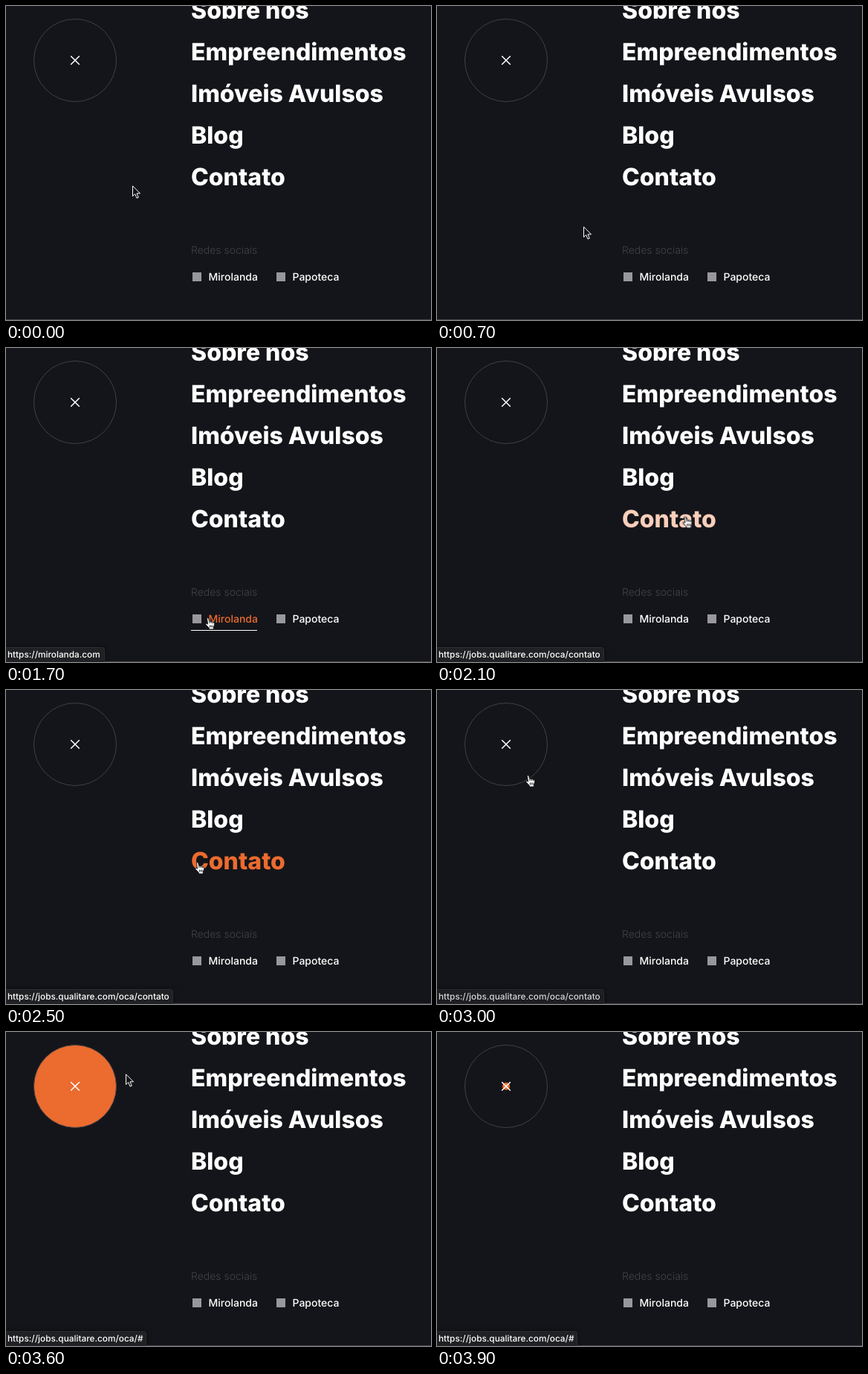
Recreate the animation shown at these times as an HTML page. Size 572 px wide and 422 px high, loop 4000 ms.

```html
<!DOCTYPE html>
<html lang="pt-BR">
<head>
<meta charset="utf-8">
<title>Menu</title>
<style>
  :root { --bg: #14151a; --accent: #ec6b2f; --loop: 4s step-end infinite; }
  html, body { margin: 0; width: 100%; height: 100%; overflow: hidden; background: var(--bg); }
  svg { display: block; width: 572px; height: 422px; }
  text { font-family: Inter, "Noto Sans", sans-serif; fill: #fff; white-space: pre; text-rendering: geometricPrecision; }
  .menu text { font-size: 32px; font-weight: 800; }
  .social text { font-size: 14px; font-weight: 450; }
  .social .label { font-weight: 300; fill: #424348; }
  .badge { fill: #98989c; }

  .ring { fill: none; stroke: #404145; }
  .cross { fill: none; stroke: #fff; stroke-width: 1.5; }
  .disc { fill: var(--accent); transform-origin: 93px 73px; animation: disc var(--loop); }

  .menu .contact { animation: contact var(--loop); }
  .social .photo { animation: photo var(--loop); }
  .underline { fill: #fff; transform-origin: 249px 379px; animation: underline var(--loop); }

  .status { visibility: hidden; }
  .status path { fill: #202124; stroke: #2c2d31; filter: drop-shadow(0 0 3px #0008); }
  .status text { font-size: 11.8px; font-weight: 500; }
  .status.a { animation: statusPhoto var(--loop); }
  .status.b { animation: statusContact var(--loop); }
  .status.c { animation: statusClose var(--loop); }

  .cursor { animation: move var(--loop); }
  .arrow { fill: #101114; stroke: #fff; animation: arrow var(--loop); }
  .hand { fill: #fff; stroke: #101114; stroke-width: .9; stroke-linejoin: round; animation: hand var(--loop); }

  /* 2.5% is one 100 ms tick */
  @keyframes move {
    0%, 5% { transform: translate(170px, 241px); }
    7.5%   { transform: translate(170px, 242px); animation-timing-function: steps(2); }
    12.5%  { transform: translate(177px, 258px); animation-timing-function: steps(2); }
    17.5%  { transform: translate(197px, 296px); }
    20%    { transform: translate(234px, 333px); }
    22.5%  { transform: translate(250px, 348px); }
    25%    { transform: translate(260px, 357px); animation-timing-function: steps(3); }
    32.5%  { transform: translate(268px, 362px); }
    42.5%  { transform: translate(268px, 362px); }
    45%    { transform: translate(290px, 342px); }
    47.5%  { transform: translate(335px, 275px); }
    50%    { transform: translate(358px, 224px); animation-timing-function: steps(3); }
    57.5%  { transform: translate(275px, 229px); animation-timing-function: steps(2); }
    62.5%  { transform: translate(254px, 231px); }
    67.5%  { transform: translate(244px, 222px); }
    70%    { transform: translate(212px, 190px); }
    72.5%  { transform: translate(160px, 146px); }
    75%    { transform: translate(119px, 114px); }
    77.5%  { transform: translate(104px, 94px); }
    80%    { transform: translate(100px, 80px); animation-timing-function: steps(2); }
    85%    { transform: translate(116px, 68px); }
    87.5%  { transform: translate(136px, 61px); }
    90%    { transform: translate(161px, 56px); }
    92.5%  { transform: translate(192px, 34px); }
    95%    { transform: translate(233px, -1px); }
    97.5%, 100% { transform: translate(260px, -30px); }
  }
  @keyframes arrow {
    0%, 45%, 67.5%, 90% { visibility: visible; }
    25%, 50%, 75%, 100% { visibility: hidden; }
  }
  @keyframes hand {
    0%, 45%, 67.5%, 90%, 100% { visibility: hidden; }
    25%, 50%, 75% { visibility: visible; }
  }
  @keyframes disc {
    0%, 75% { transform: scale(0); }
    77.5%   { transform: scale(.2); }
    80%     { transform: scale(.7); }
    82.5%   { transform: scale(.93); }
    85%, 90% { transform: scale(1); }
    92.5%   { transform: scale(.8); }
    95%     { transform: scale(.42); }
    97.5%   { transform: scale(.09); }
    100%    { transform: scale(0); }
  }
  @keyframes contact {
    0%, 75%, 100% { fill: #fff; }
    50%   { fill: #fff; animation-timing-function: steps(3); }
    57.5% { fill: var(--accent); }
    67.5% { fill: var(--accent); animation-timing-function: steps(3); }
  }
  @keyframes photo {
    0%, 50%, 100% { fill: #fff; }
    25%   { fill: #fff; animation-timing-function: steps(3); }
    32.5% { fill: var(--accent); }
    42.5% { fill: var(--accent); animation-timing-function: steps(3); }
  }
  @keyframes underline {
    0%, 50%, 100% { transform: scaleX(0); }
    25%   { transform: scaleX(.1); }
    27.5% { transform: scaleX(.5); }
    30%   { transform: scaleX(.88); }
    32.5% { transform: scaleX(1); }
    45%   { transform: scaleX(.7); }
    47.5% { transform: scaleX(.2); }
  }
  @keyframes statusPhoto {
    0%, 50%, 100% { visibility: hidden; opacity: 1; }
    25%   { visibility: visible; opacity: .5; }
    27.5% { visibility: visible; opacity: 1; }
  }
  @keyframes statusContact {
    0%, 77.5%, 100% { visibility: hidden; opacity: 1; }
    50%   { visibility: visible; opacity: 1; }
    72.5% { visibility: visible; opacity: .92; }
    75%   { visibility: visible; opacity: .82; }
  }
  @keyframes statusClose {
    0%, 100% { visibility: hidden; opacity: 1; }
    77.5% { visibility: visible; opacity: .85; }
    82.5% { visibility: visible; opacity: 1; }
  }
</style>
</head>
<body>
<svg viewBox="0 0 572 422">
  <rect width="572" height="422" fill="#14151a"/>
  <rect y="421" width="572" height="1" fill="#454146"/>

  <circle class="disc" cx="93" cy="73" r="55.5"/>
  <circle class="ring" cx="93" cy="73" r="55.5"/>
  <path class="cross" d="M87.2 67.2l11.6 11.6M98.8 67.2L87.2 78.8"/>

  <g class="menu">
    <text x="249" y="17">Sobre nós</text>
    <text x="249" y="73">Empreendimentos</text>
    <text x="249" y="129">Imóveis Avulsos</text>
    <text x="249" y="185">Blog</text>
    <text class="contact" x="249" y="241">Contato</text>
  </g>

  <g class="social">
    <text class="label" x="249" y="333">Redes sociais</text>
    <rect class="badge" x="251" y="358" width="12" height="12"/>
    <text class="photo" x="272.5" y="369">Mirolanda</text>
    <rect class="badge" x="364" y="358" width="12" height="12"/>
    <text x="385.5" y="369">Papoteca</text>
    <rect class="underline" x="249" y="379" width="89" height="1"/>
  </g>

  <g class="status a">
    <path d="M-1 402.5H129.5q3 0 3 3V423H-1z"/>
    <text x="2" y="416">https://mirolanda.com</text>
  </g>
  <g class="status b">
    <path d="M-1 402.5H221.5q3 0 3 3V423H-1z"/>
    <text x="2" y="416">https://jobs.qualitare.com/oca/contato</text>
  </g>
  <g class="status c">
    <path d="M-1 402.5H185.5q3 0 3 3V423H-1z"/>
    <text x="2" y="416">https://jobs.qualitare.com/oca/#</text>
  </g>

  <g class="cursor">
    <path class="arrow" d="M.5 .8V14.6L3.7 11.6L6 17.2L8.3 16.2L6 10.9H10.5z"/>
    <g class="hand">
      <path d="M2.5 1.5Q3.6 0 4.7 1.5L5.7 5.5Q7 4.4 8 5.9Q9.4 5 10.2 6.5Q12.3 6 12.5 8.3Q12.7 11 11.3 13V16H5.3V14.3L1 9.7Q.2 7.8 2 8L3.6 9.2z"/>
      <path d="M5.7 5.5l.4 2.500M8 5.900l.3 2.100M10.200 6.500l.2 1.800M6.400 10.500v3M8.200 10.500v3M10 10.500v3"/>
    </g>
  </g>
</svg>
</body>
</html>
```
